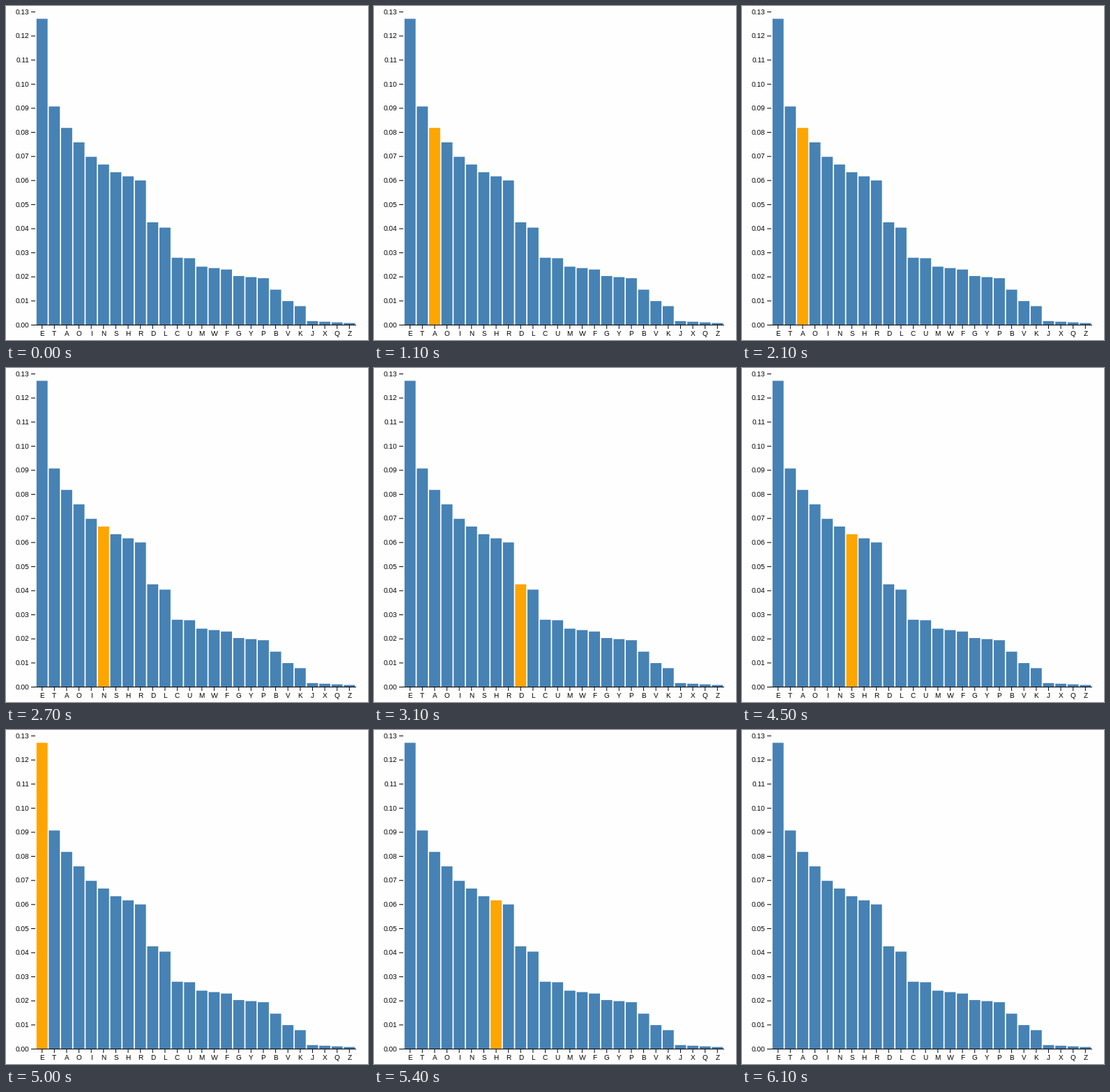
Recreate the animation shown at these times as a matplotlib script. Size 519 by 480 pixels, loop 7100 ms.

```python
import matplotlib.pyplot as plt
import numpy as np
from matplotlib.animation import FuncAnimation
from matplotlib.patches import Rectangle

plt.rcParams["text.hinting"] = "native"

W, H, DPI = 519, 480, 64          # dpi of 64 keeps the pixel size exact
LEFT, TOP, BASE, RIGHT = 42, 8, 458, 502
Y_MAX = 0.13
FRAMES, STEP_MS = 71, 100

BLUE, ORANGE, INK, PAPER = "#4682b4", "#ffa500", "#000000", "#fefefe"

LETTERS = "ETAOINSHRDLCUMWFGYPBVKJXQZ"
# Frequencies at the bends of the curve; letters in between are interpolated.
BENDS = dict(E=.127, T=.0906, A=.0817, I=.0697, S=.0633, R=.0599, D=.0425,
             L=.0403, C=.0278, U=.0276, M=.0241, F=.0229, G=.0202, P=.0193,
             V=.0098, K=.0077, J=.0015, Z=.0007)
FREQ = np.interp(range(len(LETTERS)), [LETTERS.index(c) for c in BENDS],
                 list(BENDS.values()))

PAD = 0.1
PITCH = (RIGHT - LEFT) / (len(LETTERS) + PAD)
BAND = PITCH * (1 - PAD)

# Pointer path as (step, position in bar pitches from the left edge).
PATH = [(4, 27), (5, 14.5), (7, 4.7), (9, 4.3), (11, 2.87), (20, 1.52),
        (22, 3.17), (26, 4.93), (29, 6.9), (36, 16.3), (37, 16.8),
        (38, 18.5), (40, 18.2), (41, 17.5), (47, 0.9), (48, -1), (49, -1),
        (50, 0.5), (56, 10.5), (58, 11.6), (61, 12.05)]

fig = plt.figure(figsize=(W / DPI, H / DPI), dpi=DPI, facecolor=PAPER)
ax = fig.add_axes([0, 0, 1, 1])
ax.set_xlim(0, W)
ax.set_ylim(H, 0)
ax.axis("off")


def box(x, y, w, h, color):
    return ax.add_patch(Rectangle((x, y), w, h, facecolor=color,
                                  linewidth=0, snap=False))


def label(x, y, text, align):
    ax.text(x, y, text, ha=align, va="baseline", color=INK,
            family="Liberation Sans", fontsize=10 * 72 / DPI)


def y_pos(value):
    return BASE - (BASE - TOP) * value / Y_MAX


def hovered(step):
    """Index of the bar under the pointer, or None in a gap or off the chart."""
    pos = np.interp(step, *zip(*PATH))
    index = int(np.floor(pos))
    on_bar = 0 <= index < len(LETTERS) and pos - index >= PAD
    return index if on_bar else None


bars = []
for i, (letter, freq) in enumerate(zip(LETTERS, FREQ)):
    x = LEFT + PITCH * (i + PAD)
    y = y_pos(freq)
    mid = x + BAND / 2
    bars.append(box(x, y, BAND, BASE - y, BLUE))
    box(mid - 0.5, BASE, 1, 6, INK)
    label(mid, 474, letter, "center")

box(LEFT, BASE, RIGHT - LEFT, 1, INK)

for k in range(14):
    y = y_pos(k / 100)
    box(36, y, 6, 1, INK)
    label(33, round(y + 3.7), f"{k / 100:.2f}", "right")


def draw(step):
    lit = hovered(step)
    for i, bar in enumerate(bars):
        bar.set_facecolor(ORANGE if i == lit else BLUE)
    return bars


anim = FuncAnimation(fig, draw, frames=FRAMES, interval=STEP_MS,
                     repeat=True, repeat_delay=0, blit=False)
plt.show()
```
